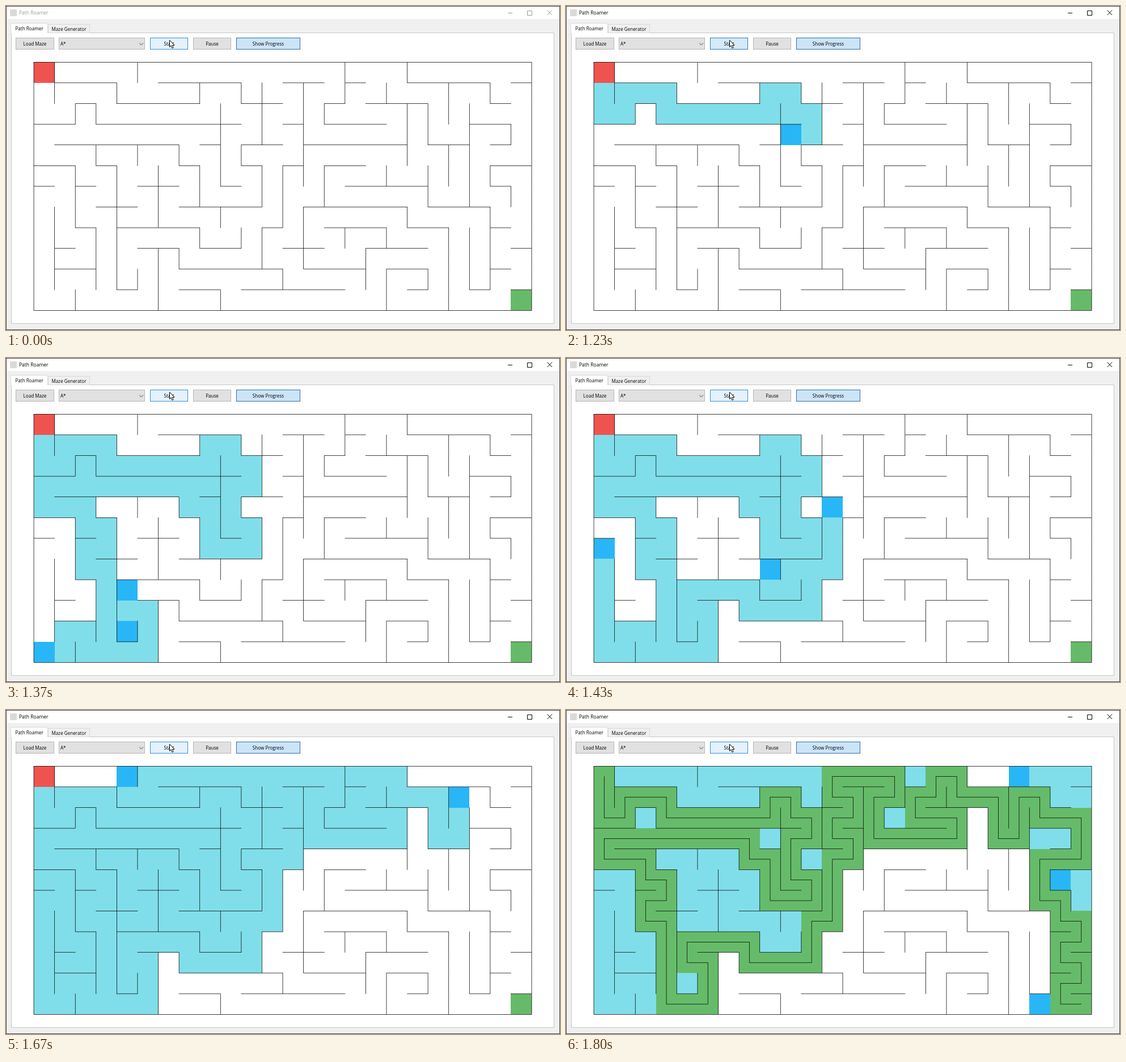
Animation of 977x573 px, one loop 3060 ms. Source, as an HTML page with a canvas:

```html
<!DOCTYPE html>
<html lang="en">
<head>
<meta charset="utf-8">
<title>Path Roamer</title>
<style>
  html, body { margin: 0; width: 100%; height: 100%; overflow: hidden; }
  #window {
    position: absolute; left: 0; top: 0; width: 977px; height: 573px;
    box-sizing: border-box; border: 1px solid #444; background: #f0f0f0;
    font: 8.1px "Open Sans", "Noto Sans", sans-serif; color: #000;
  }
  #window > * { position: absolute; box-sizing: border-box; margin: -1px 0 0 -1px; white-space: nowrap; }
  #bar { left: 1px; top: 1px; width: 975px; height: 22px; background: #fff; }
  #title { left: 23px; top: 5px; height: 14px; line-height: 14px; font-size: 8.5px; }
  #icon { left: 7px; top: 6px; width: 12px; height: 12px; background: #dcd9d8; }
  #pane { left: 9px; top: 47px; width: 958px; height: 515px; background: #fff; border: 1px solid #c6c6c6; }
  .tab { top: 32px; height: 16px; border: 1px solid #d9d9d9; line-height: 15px; text-align: center; }
  .tab.on { top: 30px; height: 18px; line-height: 18px; background: #fff; border-bottom: 0; }
  .btn {
    top: 56px; height: 21px; line-height: 20px; text-align: center;
    background: #e1e1e1; border: 1px solid #b4b4b4;
  }
  #progress { background: #cce4f7; border-color: #2970ac; }
  #algorithm { text-align: left; padding-left: 2px; }
  #maze, #marks { left: 0; top: 0; }
</style>
</head>
<body>
<div id="window">
  <div id="bar"></div>
  <div id="icon"></div>
  <div id="title">Path Roamer</div>
  <div id="pane"></div>
  <div class="tab" style="left:74px;width:74px">Maze Generator</div>
  <div class="tab on" style="left:8px;width:66px">Path Roamer</div>
  <div class="btn" style="left:17px;width:68px">Load Maze</div>
  <div class="btn" id="algorithm" style="left:93px;width:152px">A*</div>
  <div class="btn" id="start" style="left:254px;width:67px">Start</div>
  <div class="btn" style="left:330px;width:67px">Pause</div>
  <div class="btn" id="progress" style="left:406px;width:113px">Show Progress</div>
  <canvas id="maze" width="977" height="573"></canvas>
  <svg id="marks" width="977" height="573" fill="none">
    <g id="controls" stroke="#000">
      <path d="M885 12.5H893M919.5 8.5H927.5V16.5H919.5Z"/>
      <path d="M954.5 7.5L963 16M963 7.5L954.5 16"/>
    </g>
    <path d="M235 65.5L238.5 69L242 65.5" stroke="#444"/>
    <path d="M288.5 60.5V72.5L291.2 70L293.2 74.6L295.2 73.7L293.3 69.3H297Z" fill="#fff" stroke="#000"/>
  </svg>
</div>
<script>
const LOOP = 3060, COLS = 24, ROWS = 12;
const LEFT = 49.05, TOP = 99.35, CELL = 36.583, STROKE = 0.75;
const RED = '#ef5350', GREEN = '#66bb6a', VISITED = '#80deea', FRONTIER = '#29b6f6';

// Inner walls as from-to spans, one entry per grid line.
const acrossWalls = [
  '1-4 6-10 12-14 15-16 18-22 23-24',
  '2-3 4-8 10-12 14-15 16-19 22-23',
  '0-2 3-10 12-13 14-17 21-23',
  '1-7 8-9 10-12 13-18 19-21 22-23',
  '0-2 3-4 7-8 10-11 12-13 14-16 22-24',
  '0-1 2-3 5-7 9-10 15-19 22-23',
  '3-5 7-11 13-18 19-22',
  '2-3 4-8 11-12 14-17 18-20 22-23',
  '1-2 5-7 8-10 12-14 16-19 23-24',
  '1-3 7-12 13-16 17-19 22-23',
  '4-5 7-9 10-15 18-19 21-22 23-24'
];
const downWalls = [
  '0-2 7-11', '2-3 5-8 11-12', '2-3 4-5 8-11', '1-2 5-11', '0-1 4-5 10-11',
  '5-8 9-12', '4-5 9-10', '1-2 5-7 8-9', '2-6 7-8 11-12', '1-2 4-5 8-9',
  '1-4 5-7 8-10', '5-8 10-11', '1-6 7-10', '2-3 5-7', '0-2 8-9', '9-11',
  '1-2 5-6 8-9 10-12', '0-1 2-5 7-8', '2-4 5-7 10-11', '1-3 4-6 8-12',
  '2-7 8-11', '1-2 5-6 7-11', '3-4 6-7'
];
const parse = (lines, length) => [`0-${length}`, ...lines, `0-${length}`]
  .map(line => line.split(' ').map(span => span.split('-').map(Number)));
const across = parse(acrossWalls, COLS), down = parse(downWalls, ROWS);
const blocked = (spans, i) => spans.some(([from, to]) => i >= from && i < to);

function neighbours({ x, y }) {
  const list = [];
  if (!blocked(down[x], y)) list.push([x - 1, y]);
  if (!blocked(down[x + 1], y)) list.push([x + 1, y]);
  if (!blocked(across[y], x)) list.push([x, y - 1]);
  if (!blocked(across[y + 1], x)) list.push([x, y + 1]);
  return list;
}

// A* with Manhattan distance; ties go to the leftmost, then topmost cell.
function search() {
  const order = [], seen = new Set(['0,0']);
  const open = [{ x: 0, y: 0, cost: 0, score: 0, children: [] }];
  while (open.length) {
    open.sort((a, b) => a.score - b.score || a.x - b.x || a.y - b.y);
    const cell = open.shift();
    order.push(cell);
    if (cell.x === COLS - 1 && cell.y === ROWS - 1) break;
    for (const [x, y] of neighbours(cell)) {
      if (seen.has(`${x},${y}`)) continue;
      seen.add(`${x},${y}`);
      const cost = cell.cost + 1;
      const score = cost + COLS - 1 - x + ROWS - 1 - y;
      const next = { x, y, cost, score, parent: cell, children: [] };
      cell.children.push(next);
      open.push(next);
    }
  }
  return order;
}

const order = search();
const route = [];
for (let cell = order[order.length - 1]; cell; cell = cell.parent) route.push(cell);

const startButton = document.getElementById('start');
const title = document.getElementById('title');
const controls = document.getElementById('controls');
const ctx = document.getElementById('maze').getContext('2d');
const px = c => LEFT + c * CELL;
const py = r => TOP + r * CELL;

function fillCell({ x, y }, color) {
  const left = Math.round(px(x)), top = Math.round(py(y));
  ctx.fillStyle = color;
  ctx.fillRect(left, top, Math.round(px(x + 1)) - left, Math.round(py(y + 1)) - top);
}

// Adds a thin horizontal or vertical bar between two grid points.
function addLine(c1, r1, c2, r2) {
  ctx.rect(px(Math.min(c1, c2)) - STROKE / 2, py(Math.min(r1, r2)) - STROKE / 2,
    Math.abs(c2 - c1) * CELL + STROKE, Math.abs(r2 - r1) * CELL + STROKE);
}

function drawMaze(count, solved) {
  ctx.clearRect(0, 0, 977, 573);
  const visited = order.slice(0, count);
  for (const cell of visited) cell.children.forEach(next => fillCell(next, FRONTIER));
  for (const cell of visited) fillCell(cell, VISITED);
  fillCell({ x: 0, y: 0 }, RED);
  fillCell({ x: COLS - 1, y: ROWS - 1 }, GREEN);
  if (solved) route.forEach(cell => fillCell(cell, GREEN));
  ctx.beginPath();
  across.forEach((spans, r) => spans.forEach(([a, b]) => addLine(a, r, b, r)));
  down.forEach((spans, c) => spans.forEach(([a, b]) => addLine(c, a, c, b)));
  if (solved) {
    for (const { x, y, parent } of route) {
      if (parent) addLine(x + 0.5, y + 0.5, parent.x + 0.5, parent.y + 0.5);
    }
  }
  ctx.fillStyle = '#000';
  ctx.fill();
}

// Pairs of [tick, value]; a tick is 1/30 s after the window becomes active.
const searchKeys = [[3.3, 0], [5, 18], [9, 60], [14, 116], [18, 156], [22, order.length]];
const pressKeys = [[0, 0], [2.5, 1], [3.3, 1], [8, 0]];

function valueAt(keys, tick) {
  if (tick <= keys[0][0]) return keys[0][1];
  const i = keys.findIndex(([at]) => at >= tick);
  if (i < 0) return keys[keys.length - 1][1];
  const [t0, v0] = keys[i - 1], [t1, v1] = keys[i];
  return v0 + (v1 - v0) * (tick - t0) / (t1 - t0);
}

function drawTick(tick) {
  const ink = tick < 0 ? '#999' : '#000';
  title.style.color = ink;
  controls.setAttribute('stroke', ink);
  const press = valueAt(pressKeys, tick);
  startButton.style.background = `rgb(${229 - 25 * press}, ${241 - 13 * press}, ${251 - 4 * press})`;
  startButton.style.borderColor = `rgb(${46 - 5 * press}, ${144 - 32 * press}, ${222 - 50 * press})`;
  drawMaze(Math.round(valueAt(searchKeys, tick)), tick >= 22);
}

let shown = null;
const began = performance.now();
function frame() {
  const time = (performance.now() - began) % LOOP;
  const tick = Math.max(-1, Math.min(22, Math.floor((time + 3.5) * 0.03) - 32));
  if (tick !== shown) drawTick(shown = tick);
  requestAnimationFrame(frame);
}
frame();
</script>
</body>
</html>
```
